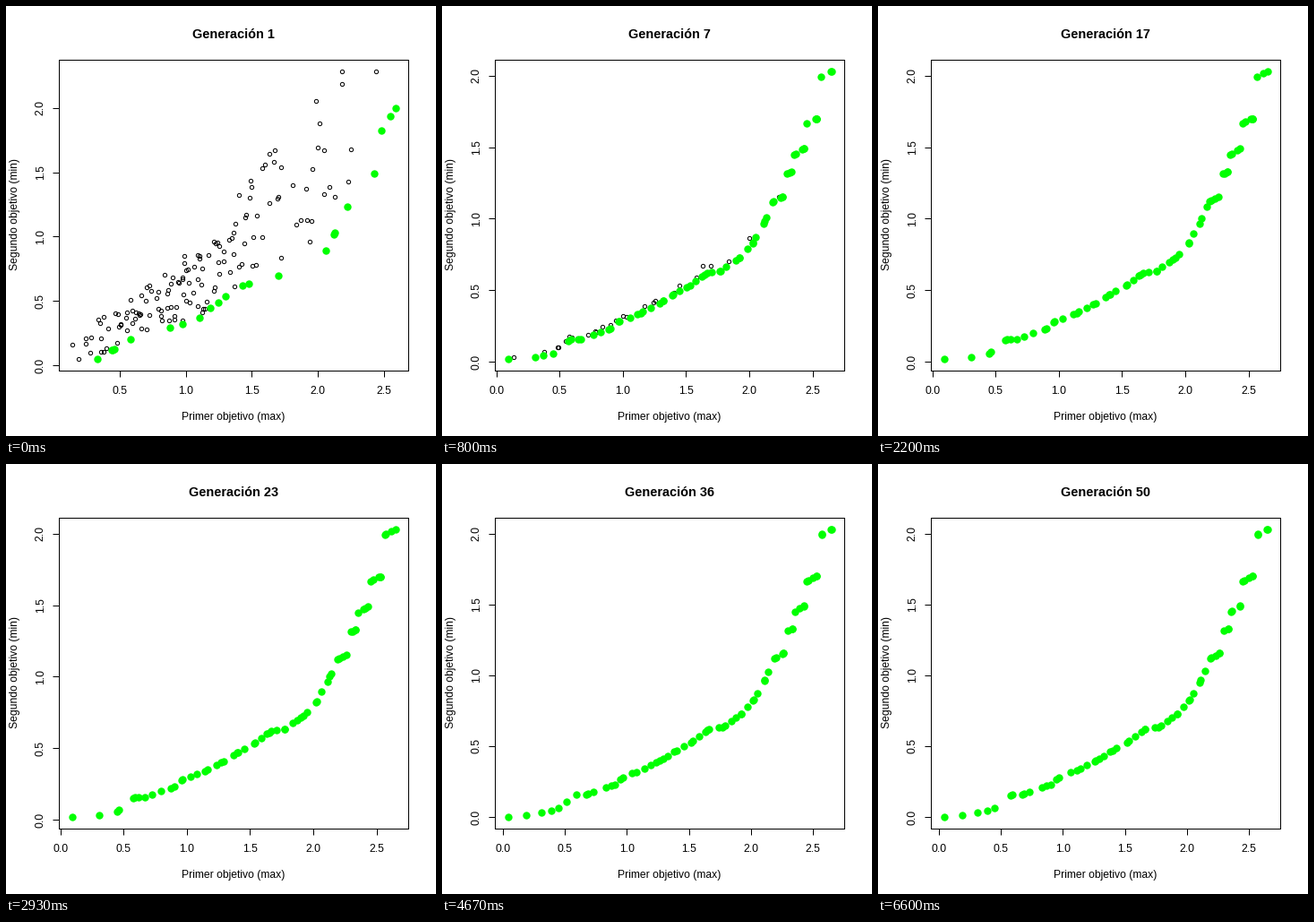
These frames come from a looping animation (480x480 px, 6.67 s). A matplotlib script:

```python
import numpy as np
import matplotlib.pyplot as plt
from matplotlib.animation import FuncAnimation
from matplotlib.ticker import MultipleLocator, StrMethodFormatter

SIZE, DPI = 480, 72
FRAMES, STEP = 230, 29
GENS = 50
GROWN = 7        # generation at which the front has settled
SLOTS = 40       # places along the front whose solutions get replaced
STEEP = 3.5      # the front has gaps where it climbs faster than this
LEFT, RIGHT, TOP, BOTTOM = 59.2, 449.2, 59.8, 406.8
GREEN = "#00ff00"

plt.rcParams.update({
    "font.family": "Liberation Sans",
    "ytick.alignment": "center",
    "axes.linewidth": 1,
})
rng = np.random.default_rng(5)

# Corners of the first and of the settled front
YOUNG = np.array([
    (0.33, 0.05), (0.58, 0.20), (0.88, 0.29), (1.10, 0.37), (1.30, 0.54),
    (1.43, 0.62), (1.70, 0.70), (2.06, 0.89), (2.22, 1.23), (2.43, 1.49),
    (2.48, 1.82), (2.588, 2.0),
])
MATURE = np.array([
    (0.31, 0.03), (0.45, 0.06), (0.59, 0.16), (0.67, 0.16), (0.90, 0.23),
    (0.965, 0.28), (1.14, 0.34), (1.29, 0.41), (1.40, 0.47), (1.53, 0.535),
    (1.665, 0.62), (1.77, 0.635), (1.92, 0.725), (2.025, 0.83),
    (2.11, 0.965), (2.19, 1.12), (2.26, 1.155), (2.30, 1.315),
    (2.335, 1.33), (2.355, 1.45), (2.43, 1.49), (2.45, 1.665),
    (2.53, 1.70), (2.57, 1.995), (2.65, 2.032),
])
# Low end of the front: first and last generation, place
LOW_END = [(7, 29, (0.092, 0.02)), (30, 50, (0.19, 0.01)),
           (36, 50, (0.04, 0.0))]
# Outermost members of the first population
EDGE = np.array([(0.137, 0.16), (0.19, 0.05), (2.185, 2.285), (2.44, 2.28)])


def low_end(gen):
    return sorted(p for first, last, p in LOW_END if first <= gen <= last)


def height(x, gen):
    """Height of the front, which sinks from YOUNG to MATURE."""
    knots = np.array(low_end(gen) + MATURE.tolist())
    young, mature = np.interp(x, *YOUNG.T), np.interp(x, *knots.T)
    return young + (mature - young) * min(1, (gen - 1) / (GROWN - 1))


def skip_gap(x):
    i = np.clip(np.searchsorted(MATURE[:, 0], x), 1, len(MATURE) - 1)
    dx, dy = MATURE[i] - MATURE[i - 1]
    return MATURE[i - 1, 0] if dy / dx > STEEP else x


def make_solutions():
    """Rows of x, birth and death along the front."""
    rows = [(x, 1, rng.integers(1, GROWN))
            for x in [*YOUNG[:, 0], *rng.uniform(0.34, 2.55, 10)]]
    rows += [(x, rng.integers(2, GROWN + 1), GENS) for x in MATURE[:, 0]]
    lo, hi = MATURE[0, 0], MATURE[-1, 0]
    for slot in range(SLOTS):
        birth = rng.integers(2, GROWN + 1)
        while birth <= GENS:
            u = ((slot + rng.random()) / SLOTS) ** 0.7
            death = birth + rng.integers(5, 12) + birth // 2
            rows.append((skip_gap(lo + (hi - lo) * u), birth, death))
            birth = death + 1
    return np.array(rows)


def make_crowd(n=140):
    """Dominated members of the first population: x, gap to the front, luck."""
    x = 0.2 + 2.2 * rng.beta(1.4, 1.8, n)
    roof = np.minimum(2.27, 0.2 + 0.4 * x + 0.3 * x ** 2)
    gap = (roof - height(x, 1)) * rng.beta(1.2, 1.3, n)
    x = np.append(x, EDGE[:, 0])
    gap = np.append(gap, EDGE[:, 1] - height(EDGE[:, 0], 1))
    return x, gap, rng.random(len(x))


solutions = make_solutions()
crowd_x, crowd_gap, luck = make_crowd()


def front_at(gen):
    x, birth, death = solutions.T
    x = x[(birth <= gen) & (gen <= death)]
    x = np.append(x, [p[0] for p in low_end(gen)])
    return x, height(x, gen)


def crowd_at(gen):
    """The crowd thins out and closes in on the front."""
    keep = luck < max(0, 1 - (gen - 1) / 15) ** 3
    x = crowd_x[keep]
    return x, height(x, gen) + crowd_gap[keep] * 0.65 ** (gen - 1)


def padded(*parts):
    values = np.concatenate(parts)
    lo, hi = values.min(), values.max()
    pad = 0.04 * (hi - lo)
    return lo - pad, hi + pad


fig = plt.figure(figsize=(SIZE / DPI, SIZE / DPI), dpi=DPI, facecolor="white")
ax = fig.add_axes([LEFT / SIZE, 1 - BOTTOM / SIZE,
                   (RIGHT - LEFT) / SIZE, (BOTTOM - TOP) / SIZE])
for axis in (ax.xaxis, ax.yaxis):
    axis.set_major_locator(MultipleLocator(0.5))
    axis.set_major_formatter(StrMethodFormatter("{x:.1f}"))
ax.tick_params(length=7, width=1, labelsize=12.1)
ax.tick_params(axis="x", pad=10.5)
ax.tick_params(axis="y", pad=7.3, labelrotation=90)


def put_text(x, y, text, size, **style):
    return fig.text(x / SIZE, 1 - y / SIZE, text, fontsize=size, ha="center",
                    va="baseline", rotation_mode="anchor", **style)


title = put_text(253.6, 36, "", 14.55, weight="bold")
put_text(254, 462, "Primer objetivo (max)", 12.1)
put_text(13, 232.5, "Segundo objetivo (min)", 12.1, rotation=90)

hollow, = ax.plot([], [], "o", ms=4.3, mfc="none", mec="black", mew=1)
solid, = ax.plot([], [], "o", ms=8.4, mfc=GREEN, mec="none", mew=0)

# One generation is held a little longer than the rest
starts = FRAMES * STEP / GENS * np.arange(GENS)
starts[29] += STEP * FRAMES / GENS / 2


def update(i):
    gen = int(np.searchsorted(starts, (i + 0.9) * STEP, side="right"))
    (fx, fy), (cx, cy) = front_at(gen), crowd_at(gen)
    ax.set_xlim(padded(fx, cx))
    ax.set_ylim(padded(fy, cy))
    solid.set_data(fx, fy)
    hollow.set_data(cx, cy)
    title.set_text(f"Generación {gen}")
    return hollow, solid, title


anim = FuncAnimation(fig, update, frames=FRAMES, interval=STEP,
                     init_func=lambda: update(0), repeat=True, repeat_delay=0)
plt.show()
```
